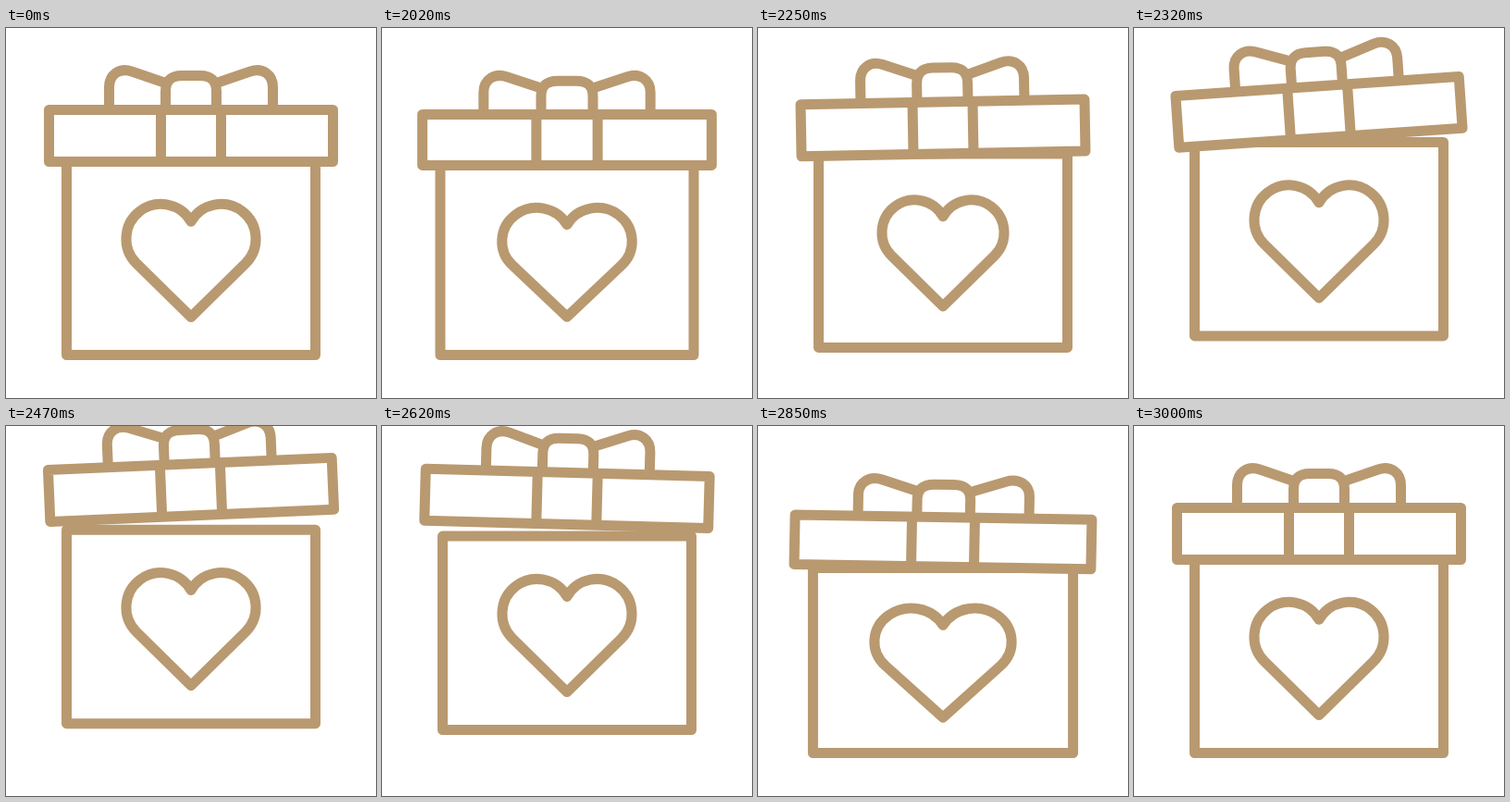
Write an HTML page that moves like this. It is 400 px wide and 400 px high and loops after 3.02 s.

```html
<!DOCTYPE html>
<html lang="en">
<head>
<meta charset="utf-8">
<title>Gift box</title>
<style>
  html, body { margin: 0; height: 100%; overflow: hidden; background: #fff; }
  svg { display: block; width: 100%; height: 100%; }
  path { fill: none; stroke: #b99970; stroke-width: 11; stroke-linejoin: round; vector-effect: non-scaling-stroke; }
  .solid { fill: #fff; }
</style>
</head>
<body>
<svg viewBox="0 0 400 400">
  <g id="box">
    <path d="M65.5 144H334.5V353.5H65.5Z"/>
    <path id="heart" d="M200 312.5L141 254.5A37.5 37.5 0 1 1 200 209.3A37.5 37.5 0 1 1 259 254.5Z"/>
    <g id="lid">
      <path d="M111.5 88V64C111.5 50 123 42.5 136 47L172.5 59.5"/>
      <path d="M288.5 88V64C288.5 50 277 42.5 264 47L227.5 59.5"/>
      <path d="M172.5 88V68.5Q172.5 51.5 190 51.5H210Q227.5 51.5 227.5 68.5V88"/>
      <path class="solid" d="M46.5 88.5H353.5V144.5H46.5Z"/>
      <path d="M167.5 88.5V144.5M232.5 88.5V144.5"/>
    </g>
  </g>
</svg>
<script>
const LOOP = 3020, REST = 2020, STEP = 25;
const [box, heart, lid] = ["box", "heart", "lid"].map(id => document.getElementById(id));

// Cosine-eased value between [time, value] keys
function keyed(t, keys) {
  if (t <= keys[0][0]) return keys[0][1];
  for (let i = 1; i < keys.length; i++) {
    const [t0, a] = keys[i - 1], [t1, b] = keys[i];
    if (t < t1) return a + (b - a) * (1 - Math.cos(Math.PI * (t - t0) / (t1 - t0))) / 2;
  }
  return keys[keys.length - 1][1];
}

// Half sine wave from start to end, zero elsewhere
const bump = (t, start, end) =>
  t > start && t < end ? Math.sin(Math.PI * (t - start) / (end - start)) : 0;

function pose(t) {
  const squash = 0.052 * (bump(t, 0, 214) + bump(t, 774, 1000));
  const jump = Math.max(0, 32 * (1 - ((t - 493) / 281) ** 2));
  const lift = keyed(t, [[217, 0], [500, 16], [950, 0]]);
  const tilt = keyed(t, [[200, 0], [350, -4.2], [720, 2.6], [950, 0]]);
  const beat = keyed(t, [[0, 1], [150, 0.77], [300, 1], [800, 1], [900, 1.025], [1000, 1]]);

  box.setAttribute("transform",
    `translate(200 ${353.5 - jump}) scale(${1 + squash} ${1 - squash}) translate(-200 -353.5)`);
  lid.setAttribute("transform", `translate(0 ${-lift}) rotate(${tilt} 200 116.5)`);
  heart.setAttribute("transform", `translate(200 251.5) scale(${beat}) translate(-200 -251.5)`);
}

function draw() {
  const t = performance.now() % LOOP;
  pose(t < REST ? 0 : STEP * (1 + Math.floor((t - REST) / STEP)));
  requestAnimationFrame(draw);
}
draw();
</script>
</body>
</html>
```
